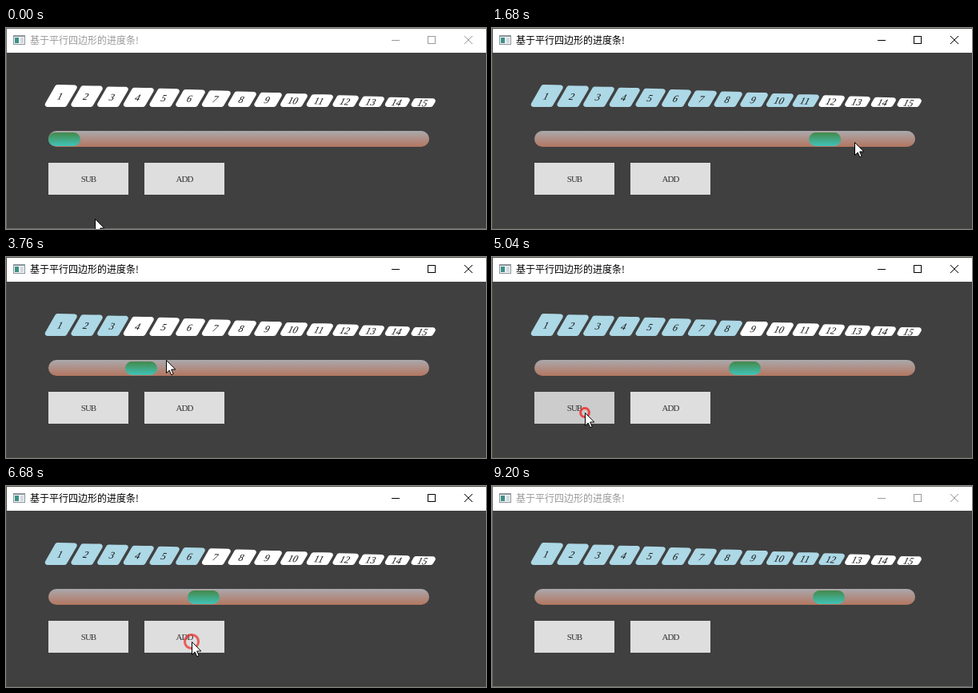
Recreate the animation shown at these times as an HTML page with a canvas. Size 600 by 252 pixels, loop 9280 ms.

```html
<!DOCTYPE html>
<html lang="zh">
<head>
<meta charset="utf-8">
<style>
html, body { margin: 0; width: 100%; height: 100%; overflow: hidden; background: #404040; }
canvas { display: block; width: 600px; height: 252px; }
</style>
</head>
<body>
<canvas id="stage" width="600" height="252"></canvas>
<script>
const ctx = document.getElementById('stage').getContext('2d');
const LOOP = 9280, STEP = 40;
const BAR = 53, UNIT = 29, COUNT = 15;
const DRAG_START = 1080, DRAG_END = 4120, HOLD = 80, RIPPLE = 170;

// eased pointer moves: from time, to time, x, y; it rests in between
const MOVES = [
  [0, 400, 304, 180], [400, 880, 64, 140],
  [1260, 1800, 505, 143], [1960, 2080, 544, 144],
  [2280, 2600, 356, 135], [2720, 3200, 33, 129],
  [3240, 3360, 118, 128], [3592, 3970, 316, 131],
  [4240, 4600, 478, 80], [4600, 4920, 116, 195],
  [5960, 6240, 232, 195],
  [7640, 7780, 512, 80], [7780, 7960, 96, 253]
];

const series = (n, first, gap) => Array.from({ length: n }, (_, i) => first + i * gap);
const SUBS = series(5, 4990, 170);
const ADDS = series(9, 6270, 162);

const clamp = (v, lo, hi) => Math.max(lo, Math.min(hi, v));
const ease = k => 0.5 - 0.5 * Math.cos(Math.PI * k);

function pointer(t) {
  let x = 111, y = 239;
  for (const [from, to, toX, toY] of MOVES) {
    const k = ease(clamp((t - from) / (to - from), 0, 1));
    x += (toX - x) * k;
    y += (toY - y) * k;
  }
  return [x, y];
}

// the handle follows the pointer one step late, then obeys the buttons
function valueAt(t) {
  if (t < DRAG_START) return 0;
  const x = pointer(Math.min(t, DRAG_END) - STEP)[0] - 20 - BAR;
  const dragged = clamp(x / UNIT, 0, COUNT);
  const done = list => list.filter(c => t >= c + HOLD).length;
  const subs = done(SUBS);
  return subs ? Math.floor(dragged) - subs + done(ADDS) : dragged;
}

function rect(x, y, w, h, color) {
  ctx.fillStyle = color;
  ctx.fillRect(x, y, w, h);
}

function line(x1, y1, x2, y2, color) {
  ctx.beginPath();
  ctx.moveTo(x1, y1);
  ctx.lineTo(x2, y2);
  ctx.strokeStyle = color;
  ctx.lineWidth = 1;
  ctx.stroke();
}

function text(s, x, y, font, color, align = 'center', spacing = 0) {
  ctx.font = font;
  ctx.letterSpacing = spacing + 'px';
  ctx.fillStyle = color;
  ctx.textAlign = align;
  ctx.fillText(s, x, y);
}

function pill(x, y, w, h, top, bottom) {
  const g = ctx.createLinearGradient(0, y, 0, y + h);
  g.addColorStop(0, top);
  g.addColorStop(1, bottom);
  ctx.beginPath();
  ctx.roundRect(x, y, w, h, h / 2);
  ctx.fillStyle = g;
  ctx.fill();
}

function drawWindow(active) {
  const ink = active ? '#000' : '#999';
  rect(0, 0, 600, 252, active ? '#4d4d43' : '#6c6c64');
  rect(1, 31, 599, 220, '#404040');
  rect(1, 1, 599, 30, '#fff');
  // window icon
  rect(9, 9, 15, 12, '#8b949b');
  rect(10, 11, 13, 9, '#f4f6f7');
  rect(11, 12, 5, 7, '#3c9188');
  rect(18, 12, 4, 7, '#d3dadf');
  text('基于平行四边形的进度条!', 30, 20, '12px "Noto Sans CJK SC", "Noto Sans CJK", sans-serif', ink, 'left');
  line(482, 15.5, 492, 15.5, ink);
  ctx.strokeRect(527.5, 10.5, 9, 9);
  line(573, 10, 583, 20, ink);
  line(583, 10, 573, 20, ink);
}

function drawBlock(i, lit) {
  const x = 46.5 + 32.7 * i, y = 99, w = 28.5, h = 28 - 1.21 * i, s = 0.57 * h;
  const pts = [[x + s, y - h], [x + s + w, y - h + 0.5], [x + w, y], [x, y]];
  ctx.beginPath();
  ctx.moveTo(x + s + w / 2, y - h + 0.25);
  [1, 2, 3, 0].forEach(k => ctx.arcTo(...pts[k], ...pts[(k + 1) % 4], 3));
  ctx.closePath();
  ctx.fillStyle = lit ? '#add8e6' : '#fff';
  ctx.fill();
  ctx.save();
  ctx.transform(1, 0.08, -0.5, 1, x + (s + w) / 2 - 1, y - h / 2 + 0.5);
  text(i + 1, 0, 4, '12px "Liberation Serif", serif', '#111');
  ctx.restore();
}

function drawButton(label, x, clicks, t) {
  const down = clicks.some(c => t >= c && t < c + HOLD);
  rect(x, 169, 100, 40, down ? '#cccccc' : '#dedede');
  text(label, x + 50, 193, '11px "Liberation Serif", serif', '#333', 'center', -1);
}

function drawRipple(t, x, y) {
  const click = [...SUBS, ...ADDS].find(c => t >= c && t < c + RIPPLE);
  if (click === undefined) return;
  const k = (t - click) / RIPPLE;
  ctx.beginPath();
  ctx.arc(x, y, 1 + 15 * k, 0, 2 * Math.PI);
  ctx.strokeStyle = `rgba(238,45,40,${1 - 0.55 * k})`;
  ctx.lineWidth = 3;
  ctx.stroke();
}

function drawPointer(x, y) {
  ctx.save();
  ctx.translate(Math.round(x) + 0.5, Math.round(y) + 0.5);
  const arrow = new Path2D('M0 0V16L3.7 12.6L6.2 18.3L8.6 17.2L6.2 11.5H11.3Z');
  ctx.fillStyle = '#fff';
  ctx.fill(arrow);
  ctx.strokeStyle = '#000';
  ctx.lineWidth = 1;
  ctx.stroke(arrow);
  ctx.restore();
}

function draw(t) {
  const value = valueAt(t);
  const [x, y] = pointer(t);
  drawWindow(t >= 1040 && t < 9200);
  for (let i = 0; i < COUNT; i++) drawBlock(i, i < Math.floor(value));
  pill(BAR, 129, 476, 20, '#aaa9ad', '#b37660');
  pill(BAR + value * UNIT, 131, 40, 17, '#44884a', '#40c4b8');
  drawButton('SUB', 53, SUBS, t);
  drawButton('ADD', 173, ADDS, t);
  drawRipple(t, x, y);
  if (t < 7960) drawPointer(x, y);
}

const start = performance.now();
function tick() {
  const t = (performance.now() - start) % LOOP;
  draw(Math.floor(t / STEP) * STEP);
  requestAnimationFrame(tick);
}
tick();
</script>
</body>
</html>
```
